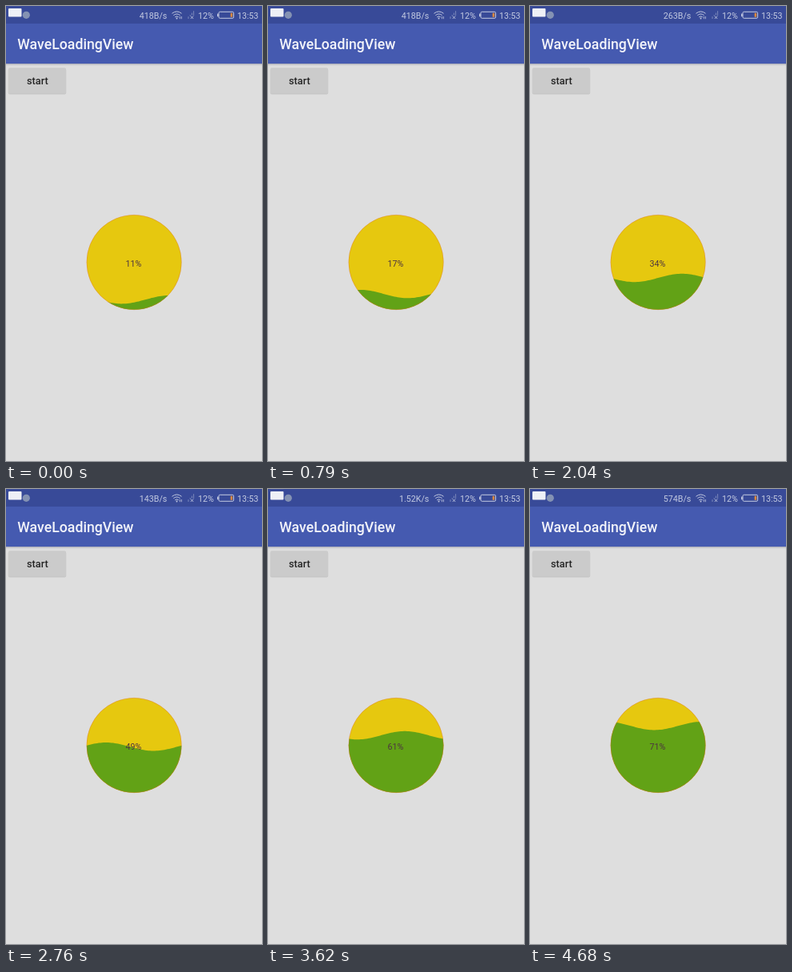
Recreate the animation shown at these times as an HTML page. Size 320 by 569 pixels, loop 5.01 s.

```html
<!DOCTYPE html>
<html lang="en">
<head>
<meta charset="utf-8">
<title>WaveLoadingView</title>
<style>
  html, body { margin: 0; width: 100%; height: 100%; overflow: hidden; background: #dedede; }
  svg { display: block; width: 100%; height: 100%; }
  text { font-family: Roboto, "Noto Sans", sans-serif; }
  .status { font-size: 10.67px; fill: #c3cae1; }
</style>
</head>
<body>
<svg viewBox="0 0 320 569" preserveAspectRatio="none">
  <defs>
    <clipPath id="disc"><circle cx="160.1" cy="320.5" r="59.3"/></clipPath>
    <linearGradient id="shade" x2="0" y2="1">
      <stop offset="0" stop-color="#8d8fa0" stop-opacity=".75"/>
      <stop offset="1" stop-color="#dedede" stop-opacity="0"/>
    </linearGradient>
  </defs>

  <rect width="320" height="22" fill="#384a98"/>
  <rect y="22" width="320" height="50" fill="#455ab0"/>
  <rect y="72" width="320" height="3.5" fill="url(#shade)"/>

  <rect x="3" y="3" width="16.5" height="10.5" rx="1" fill="#eef0f6"/>
  <circle cx="25.3" cy="11.3" r="4.6" fill="#8492b3"/>
  <text id="speed" class="status" x="201.3" y="16" text-anchor="end"></text>

  <g fill="none" stroke="#c3cae1">
    <path d="M207.5 9.3Q213.5 4.6 219.5 9.3M209.4 11.6Q213.5 8.4 217.6 11.6M211.3 13.8Q213.5 12 215.7 13.8"/>
    <path d="M217.4 13v3.2M219.4 13v3.2" stroke-width=".8"/>
    <path d="M228 13.2v2.8M230.2 11v1.4M232.4 8.6v3M234.6 6.2v5.6" stroke-width=".9" opacity=".55"/>
    <path d="M230.8 12.6l3.4 3.4m0-3.4l-3.4 3.4" stroke-width=".9"/>
    <rect x="266" y="7.3" width="18.6" height="8" rx="1.4"/>
  </g>
  <circle cx="213.5" cy="15.4" r="1" fill="#c3cae1"/>
  <rect x="264" y="9.6" width="1.6" height="3.6" fill="#c3cae1"/>
  <rect x="280.6" y="8.8" width="2.6" height="5" fill="#d9873f"/>
  <text class="status" x="240" y="16">12%</text>
  <text class="status" x="289" y="16">13:53</text>

  <text x="14.3" y="54" font-size="17.7" font-weight="500" fill="#f3f4fa">WaveLoadingView</text>

  <rect x="2.8" y="78" width="72.4" height="32.6" rx="2" fill="#b9b9b9" opacity=".7"/>
  <rect x="3" y="77.3" width="72" height="32.3" rx="1.8" fill="#cbcbcb"/>
  <text x="39.4" y="98" font-size="12.7" font-weight="500" text-anchor="middle" fill="#242424">start</text>

  <circle cx="160.1" cy="320.5" r="59.3" fill="#e6c80f"/>
  <path id="wave" clip-path="url(#disc)" fill="#62a216"/>
  <circle cx="160.1" cy="320.5" r="59.2" fill="none" stroke="#d9603c" stroke-width=".5" opacity=".65"/>
  <text id="label" x="159.5" y="326" font-size="10.67" text-anchor="middle" fill="#4d3540"></text>
</svg>
<script>
  const LOOP = 5010, BEAT = 130, PERIOD = 119, AMP = 5.2;

  // Key poses: the picture rests for `hold` ms, then steps on once per beat.
  const poses = [
    { at: 0,    hold: 70,  percent: 11, crest: 204, speed: "418B/s" },
    { at: 790,  hold: 400, percent: 17, crest: 234, speed: "263B/s" },
    { at: 1520, hold: 260, percent: 26, crest: 275, speed: "263B/s" },
    { at: 2040, hold: 260, percent: 34, crest: 309, speed: "143B/s" },
    { at: 2760, hold: 130, percent: 49, crest: 363, speed: "1.52K/s" },
    { at: 3620, hold: 400, percent: 61, crest: 409, speed: "574B/s" },
    { at: 4680, hold: 330, percent: 71, crest: 453, speed: "574B/s" }
  ];

  const $ = id => document.getElementById(id);
  const wave = $("wave"), label = $("label"), speed = $("speed");
  const mix = (a, b, u) => a + (b - a) * u;

  function stateAt(t) {
    const i = poses.findLastIndex(p => p.at <= t);
    const a = poses[i], b = poses[i + 1], rest = t - a.at - a.hold;
    if (!b || rest < 0) return { ...a, speed: poses[Math.max(0, i - 1)].speed };
    const u = (a.hold + Math.floor(rest / BEAT) * BEAT) / (b.at - a.at);
    // The rate readout changes only after the first pose has passed.
    return {
      percent: mix(a.percent, b.percent, u),
      crest: mix(a.crest, b.crest, u),
      speed: i ? a.speed : poses[0].speed
    };
  }

  function wavePath(crest, level) {
    let d = "M100 381";
    for (let x = 100; x <= 221; x += 2) {
      const y = level - AMP * Math.cos((x - crest) * 2 * Math.PI / PERIOD);
      d += `L${x} ${y.toFixed(2)}`;
    }
    return d + "V381Z";
  }

  function draw(t) {
    const s = stateAt(t);
    wave.setAttribute("d", wavePath(s.crest, 380.2 - 1.183 * s.percent));
    label.textContent = Math.round(s.percent) + "%";
    speed.textContent = s.speed;
  }

  const start = performance.now();
  function frame() {
    draw((performance.now() - start) % LOOP);
    requestAnimationFrame(frame);
  }
  frame();
</script>
</body>
</html>
```
